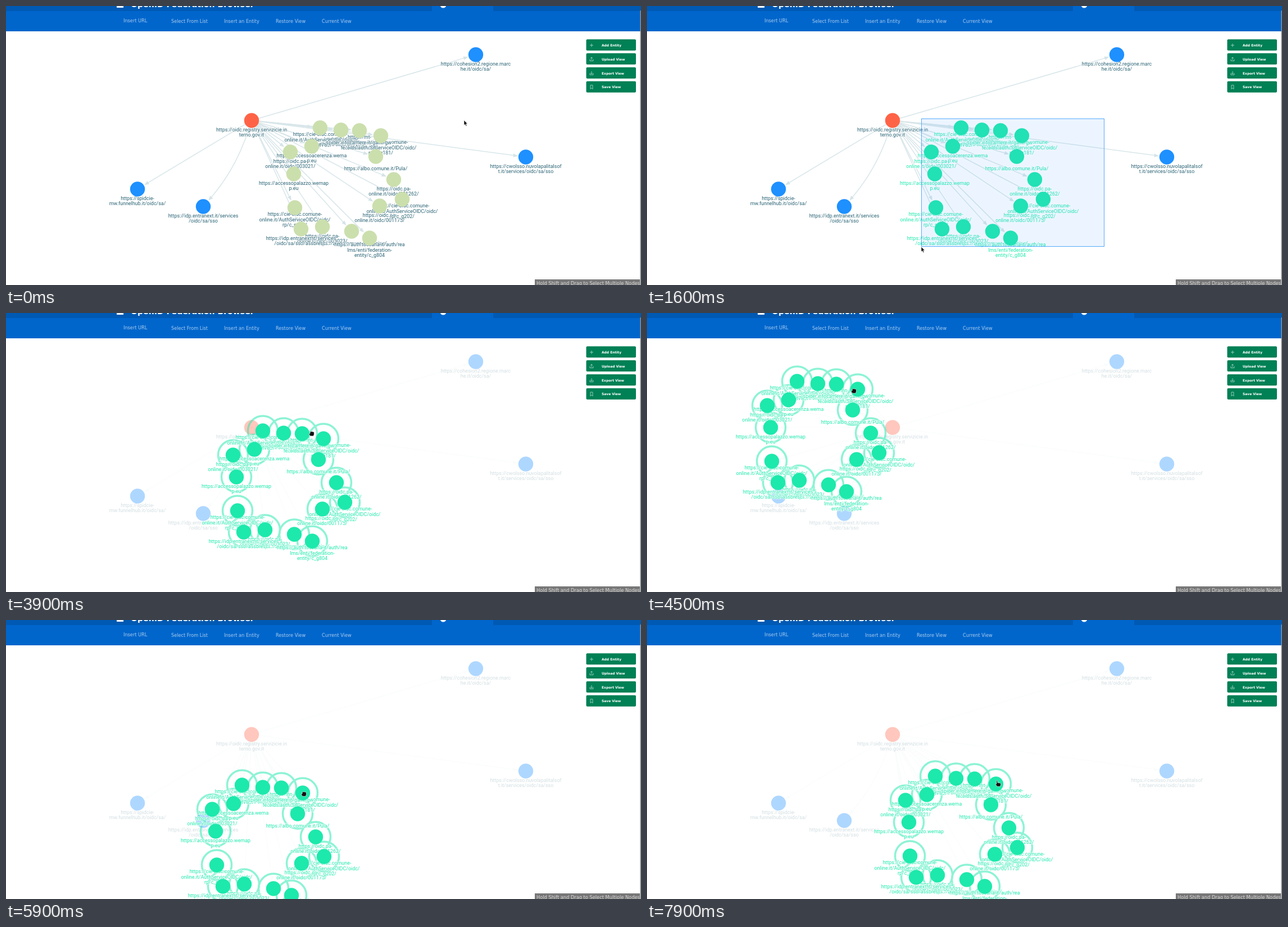
Recreate the animation shown at these times as an HTML page. Size 1130 by 496 pixels, loop 8000 ms.

```html
<!DOCTYPE html>
<html lang="en">
<head>
<meta charset="utf-8">
<title>Federation graph</title>
<style>
  html, body { margin: 0; width: 1130px; height: 496px; overflow: hidden; background: #fff; }
  svg { display: block; }
  .ui { font-family: "DejaVu Sans", sans-serif; }
  .nav { font-size: 8.2px; fill: #acccef; }
  .title { font-size: 14.1px; font-weight: bold; fill: #fff; }
  .button { font-size: 5.95px; font-weight: bold; fill: #fff; }
  .icon { fill: none; stroke: #b5dccd; stroke-width: .8; }
  .hint { font-size: 8.25px; fill: #d8d8d8; }
  .label {
    font: 8.92px Roboto, sans-serif; text-anchor: middle; fill: #2a6475;
    stroke: #fff; stroke-width: 1.6px; stroke-linejoin: round; paint-order: stroke;
  }
  .dot { fill: #cbdfad; }
  .active.dot, .active.label { fill: #1de9ac; }
  .ring { fill: none; stroke: #1de9ac; stroke-width: 3.5; }
  .edge { fill: none; stroke: #d8e6ea; stroke-width: 1.5; }
  .arrow { fill: #d5e4e8; }
  #lasso { fill: rgba(75, 160, 255, .1); stroke: #55aaff; }
  #cursor path { fill: #111; stroke: #fff; stroke-width: .6; stroke-linejoin: round; }
</style>
</head>
<body>
<svg width="1130" height="496" viewBox="0 0 1130 496">
  <g id="graph" transform="translate(0 .5)">
    <g id="edges"></g>
    <g id="fixedLabels"></g>
    <g id="fixedDots"></g>
    <g id="cluster">
      <g id="rings"></g>
      <g id="labels"></g>
      <g id="dots"></g>
    </g>
  </g>
  <rect id="lasso"/>

  <g class="ui">
    <rect width="1130" height="45" fill="#0066cc"/>
    <path d="M0 0H758V9H0zM867 0H1130V9H867z" fill="#0059b3"/>
    <rect x="197" y="-9" width="12" height="12" fill="#fff"/>
    <text class="title" x="222" y="2">OpenID Federation Browser</text>
    <circle cx="778" cy="-2" r="5.5" fill="#fff"/>
    <g class="nav">
      <text x="209" y="29">Insert URL</text>
      <text x="294" y="30">Select From List</text>
      <text x="388" y="30">Insert an Entity</text>
      <text x="480" y="30">Restore View</text>
      <text x="562" y="30">Current View</text>
    </g>
    <g id="buttons"></g>
    <rect x="941" y="486" width="187" height="10" fill="#777"/>
    <text class="hint" x="944" y="496">Hold Shift and Drag to Select Multiple Nodes</text>
    <rect x="1128.5" y="8" width="1.5" height="488" fill="#8c8f92"/>
  </g>

  <g id="cursor">
    <path id="pointer" d="M0 0V9L2 7.3L3.6 10.4L5 9.7L3.6 6.6H6.3z"/>
    <path id="finger" d="M-3 -8.5Q-2 -9.5 -1.2 -8.5V-5L4 -4Q5 -3.5 4.6 -1.5L3.6 2H-1.8L-5 -2Q-4.5 -3.5 -3 -2.5z"/>
    <path id="fist" d="M-3 -3Q-2 -4.5 -.7 -3.5Q.6 -4.5 1.8 -3.3Q3.5 -3.8 4.3 -2V1.5L3 4.3H-2.5L-4.7 1Q-4.8 -.5 -3 -.5z"/>
  </g>
</svg>
<script>
const LOOP = 8000, STEP = 100, RADIUS = 13.2;
const $ = id => document.getElementById(id);

function add(parent, tag, attrs, text) {
  const el = document.createElementNS("http://www.w3.org/2000/svg", tag);
  for (const k in attrs) el.setAttribute(k, attrs[k]);
  if (text) el.textContent = text;
  parent.appendChild(el);
  return el;
}

const node = (x, y, text, fill, bend) => ({ x, y, text, fill, bend });
const cie = end => `https://cie-oidc.comune-|online.it/AuthServiceOIDC/oidc/|rp/c_${end}/`;
const pa = end => `https://oidc.pa-|online.it/oidc/${end}/`;
const blue = "#1e90ff";

const root = node(437, 203, "https://oidc.registry.servizicie.in|terno.gov.it", "#ff6347");
const outer = [
  node(836, 86, "https://cohesion2.regione.marc|he.it/oidc/sa/", blue),
  node(925, 268, "https://cwolsso.nuvolapalitalsof|t.it/services/oidc/sa/sso", blue),
  node(234, 325, "https://spidcie-|mw.funnelhub.it/oidc/sa/", blue),
  node(351, 356, "https://idp.entranext.it/services|/oidc/sa/sso", blue, [410, 288])
];

// Later nodes are painted over earlier ones.
const grabbed = node(667, 230, cie("g181"));
const inner = [
  node(596, 220, pa("001235")),
  node(559, 216, cie("f783")),
  grabbed,
  node(629, 221, "https://mt-|spider.infocamere.it/gami-gw-|fe/oids-auth/SA/"),
  node(506, 259, pa("003021")),
  node(544, 249, "https://accessoacerenza.wema|p.eu"),
  node(512, 298, "https://accessopalazzo.wemap|p.eu"),
  node(658, 267, "https://albo.comune.it/Pula/"),
  node(690, 308, pa("001262")),
  node(665, 355, pa("001175")),
  node(705, 343, cie("g202")),
  node(514, 358, cie("g273")),
  node(615, 400, "https://albo.comune.it/iglesias/"),
  node(563, 392, pa("003023")),
  node(525, 396, "https://idp.entranext.it/services|/oidc/sa/sso/assbresc/"),
  node(647, 412, "https://auth.toscana.it/auth/rea|lms/enti/federation-|entity/c_g804")
];

function addLabel(parent, n) {
  const lines = n.text.split("|");
  n.label = add(parent, "text", { class: "label" });
  lines.forEach((line, i) =>
    add(n.label, "tspan", { x: n.x, y: n.y + 24 + (i - (lines.length - 1) / 2) * 9.4 }, line));
}

for (const n of [root, ...outer]) {
  addLabel($("fixedLabels"), n);
  n.dot = add($("fixedDots"), "circle", { cx: n.x, cy: n.y, r: RADIUS, fill: n.fill });
}
for (const n of inner) {
  add($("rings"), "circle", { class: "ring", cx: n.x, cy: n.y, r: 26.5 });
  addLabel($("labels"), n);
  n.dot = add($("dots"), "circle", { class: "dot", cx: n.x, cy: n.y, r: RADIUS });
}
for (const n of [...outer, ...inner]) {
  n.edge = add($("edges"), "path", { class: "edge" });
  n.arrow = add($("edges"), "path", { class: "arrow" });
}

[["Add Entity", "M-3 0H3M0 -3V3"],
 ["Upload View", "M-3 0V3H3V0M0 1.5V-3.5M-1.8 -1.8L0 -3.5L1.8 -1.8"],
 ["Export View", "M-3 0V3H3V0M0 1.5V-3.5M-1.8 -.2L0 1.5L1.8 -.2"],
 ["Save View", "M-2 -3.5H2V3.5L0 1.5L-2 3.5z"]
].forEach(([name, icon], i) => {
  const g = add($("buttons"), "g", { transform: `translate(1032.5 ${59.3 + i * 24.8})` });
  add(g, "rect", { width: 88.5, height: 20, rx: 2, fill: "#008055" });
  add(g, "path", { class: "icon", d: icon, transform: "translate(9.5 10.5)" });
  add(g, "text", { class: "button", x: 27.5, y: 12.8 }, name);
});

const progress = (t, from, to) => Math.min(1, Math.max(0, (t - from) / (to - from)));
const mix = (a, b, p) => a.map((v, i) => v + (b[i] - v) * p);

// Turning points of the drag: time and offset of the cluster.
const turns = [
  [3300, 0, 0], [3900, -102, -7], [4200, -252, -76], [4500, -292, -95], [4800, -357, -92], [5100, -344, -59],
  [5200, -271, 28], [5500, -165, 82], [5900, -139, 77], [6300, -154, 70], [6700, -128, 81.5], [7300, -46, 61]
];

function dragAt(t) {
  const i = Math.max(1, turns.findIndex(k => k[0] >= t));
  const last = turns[turns.length - 1];
  if (t >= last[0]) return last.slice(1);
  const [a, b] = [turns[i - 1], turns[i]];
  return mix(a.slice(1), b.slice(1), progress(t, a[0], b[0]));
}

const LASSO_FROM = [814, 200], LASSO_TO = [488, 428], HOVER = [683, 236];

function mouseAt(t) {
  if (t < 300) return [815, 203];
  if (t < 2000) return mix(LASSO_FROM, LASSO_TO, progress(t, 400, 1600));
  if (t <= 3300) return mix(LASSO_TO, HOVER, progress(t, 2000, 2400));
  // The cluster trails the hand by a moment.
  const [dx, dy] = dragAt(t + 50);
  return [grabbed.x + dx + 4, grabbed.y + dy + 3];
}

function drawEdge(n, dx, dy) {
  const x = n.x + dx, y = n.y + dy;
  const [bx, by] = n.bend || [(root.x + x) / 2, (root.y + y) / 2];
  const a = Math.atan2(y - by, x - bx), b = Math.atan2(by - root.y, bx - root.x);
  const back = (d, side) =>
    `${x - d * Math.cos(a) - side * Math.sin(a)} ${y - d * Math.sin(a) + side * Math.cos(a)}`;
  const from = `${root.x + RADIUS * Math.cos(b)} ${root.y + RADIUS * Math.sin(b)}`;
  n.edge.setAttribute("d", `M${from}Q${bx} ${by} ${back(20, 0)}`);
  n.arrow.setAttribute("d", `M${back(14, 0)}L${back(22.5, 3.3)}L${back(22.5, -3.3)}z`);
}

const show = (id, on) => $(id).setAttribute("display", on ? "inline" : "none");

function drawLasso(t, mx, my) {
  const on = t > 400 && t < 2000;
  show("lasso", on);
  if (!on) return;
  const [right, top] = LASSO_FROM;
  const box = { x: mx + .5, y: top + .5, width: right - mx - 1, height: my - top - 1 };
  for (const k in box) $("lasso").setAttribute(k, box[k]);
}

function draw(t) {
  const [mx, my] = mouseAt(t), [dx, dy] = t > 3300 ? dragAt(t) : [0, 0];
  const dim = progress(t, 2000, 2400);
  const fade = low => 1 - (1 - low) * dim;

  drawLasso(t, mx, my);
  for (const n of inner) {
    const active = t >= 1600 || (t > 400 && n.x > mx && n.y < my);
    n.dot.classList.toggle("active", active);
    n.label.classList.toggle("active", active);
    drawEdge(n, dx, dy);
  }
  for (const n of outer) drawEdge(n, 0, 0);

  $("cluster").setAttribute("transform", `translate(${dx} ${dy})`);
  $("rings").setAttribute("opacity", .5 * dim);
  $("edges").setAttribute("opacity", fade(.1));
  $("fixedLabels").setAttribute("opacity", fade(.2));
  for (const n of [root, ...outer]) n.dot.setAttribute("opacity", fade(.36));

  const fist = t >= 3200 && t < 7600, pointer = t < 3100;
  show("fist", fist);
  show("pointer", pointer);
  show("finger", !fist && !pointer);
  $("cursor").setAttribute("transform", `translate(${mx} ${my})`);
}

const start = performance.now();
function tick() {
  const t = Math.max(0, performance.now() - start) % LOOP;
  draw(Math.floor(t / STEP) * STEP);
  requestAnimationFrame(tick);
}
tick();
</script>
</body>
</html>
```
